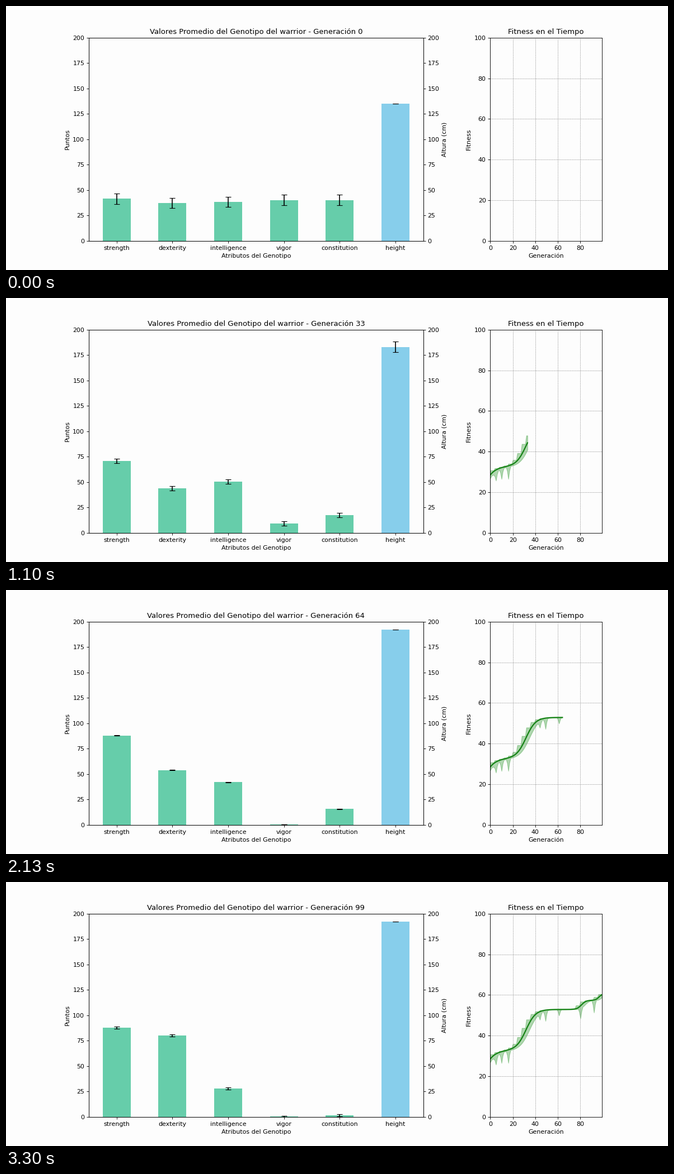
A matplotlib script for the animation above (3.33 s loop, 1183 by 473 pixels).

```python
import numpy as np
import matplotlib.pyplot as plt
from matplotlib.animation import FuncAnimation

W, H, DPI = 1183, 473, 79
LOOP_MS, STEP_MS = 3330, 30
FRAMES = LOOP_MS // STEP_MS
GENERATIONS = 100
PAPER = "#fdfdfd"

gens = np.arange(GENERATIONS)


def sigmoid(g, center, scale):
    return 1 / (1 + np.exp((center - g) / scale))


def bump(center, width):
    return np.exp(-((gens - center) / width) ** 2 / 2)


def trend(*points):
    return np.interp(gens, *zip(*points))


def mean_fitness(g):
    """Quick early gain, then three evolutionary leaps."""
    return (28.5 + 4.3 * (1 - np.exp(-g / 6)) + 20.1 * sigmoid(g, 31.7, 4.3)
            + 4.5 * sigmoid(g, 81, 2) + 3.2 * sigmoid(g, 96.5, 1.5))


# Attribute means: trends through a few (generation, value) turning points
means = {
    "strength": trend((0, 41.5), (16, 61.5), (64, 88), (79, 80.8), (99, 87.8)),
    "dexterity": trend((0, 37.3), (16, 38.5), (64, 54), (99, 80.2)),
    "intelligence": trend((0, 38.6), (16, 51.3), (44, 50.2), (99, 28)),
    "vigor": trend((0, 40.3), (16, 23.3), (44, 0.5), (99, 0.5)),
    "constitution": trend((0, 40.3), (16, 23), (33, 17.5), (79, 15), (99, 1.5)),
    "height": 135 + 57.2 * sigmoid(gens, 30, 1.8),
}
names = list(means)
values = np.array(list(means.values()))

# Deviations: wide at first, then wider again around each leap
spread = 5 * np.exp(-gens / 8) + 3 * bump(40, 9) + 2 * bump(88, 10)
devs = np.tile(spread, (len(names), 1))
devs[-1] = 5.4 * bump(34, 8) + 2.4 * bump(79, 5)
devs = np.minimum(devs, values)

# The best run ahead in steps of four generations, the worst lag by three
average = mean_fitness(gens)
best = mean_fitness(gens // 4 * 4 + 4.5)
worst = mean_fitness(np.maximum(gens - 3, 0))
DIPS = {0: 1.7, 5: 4, 10: 5, 16: 6, 44: 3, 49: 5, 61: 3, 80: 5, 92: 6}
for center, depth in DIPS.items():
    worst -= depth * np.maximum(0, 1 - np.abs(gens - center) / 1.5)

plt.rcParams["font.family"] = "DejaVu Sans"
fig, (ax, fit_ax) = plt.subplots(
    1, 2, figsize=(W / DPI, H / DPI), dpi=DPI, facecolor=PAPER,
    gridspec_kw={"width_ratios": [3, 1], "wspace": 0.3})
height_ax = ax.twinx()

ax.set(ylim=(0, 200), ylabel="Puntos", xlabel="Atributos del Genotipo",
       facecolor=PAPER)
ax.set_xticks(range(len(names)), names)
title = ax.set_title("")

fit_ax.set(xlim=(0, GENERATIONS - 1), ylim=(0, 100), xlabel="Generación",
           ylabel="Fitness", title="Fitness en el Tiempo", facecolor=PAPER)
fit_ax.set_xticks(range(0, GENERATIONS, 20))
fit_ax.grid(color="gray", linestyle="--", linewidth=0.5)

xs = np.arange(len(names))
bars = [*ax.bar(xs[:-1], 0, 0.5, color="mediumaquamarine"),
        *height_ax.bar(xs[-1:], 0, 0.5, color="skyblue")]
stems = height_ax.vlines(xs, 0, 0, color="black", linewidth=1.5)
caps, = height_ax.plot([], [], "_", color="black", markersize=10, markeredgewidth=1)
height_ax.set(xlim=(-0.5, 5.5), ylim=(0, 200), ylabel="Altura (cm)")

band = fit_ax.fill_between([0, 0], [0, 0], color="green", alpha=0.3)
line, = fit_ax.plot([], [], color="#148214", linewidth=2)


def update(frame):
    gen = int(frame * GENERATIONS / FRAMES + 0.8)
    title.set_text(f"Valores Promedio del Genotipo del warrior - Generación {gen}")
    mean, dev = values[:, gen], devs[:, gen]
    for bar, value in zip(bars, mean):
        bar.set_height(value)
    low, high = mean - dev, mean + dev
    stems.set_segments([[(x, a), (x, b)] for x, a, b in zip(xs, low, high)])
    caps.set_data(np.tile(xs, 2), np.concatenate([low, high]))

    past = slice(0, gen + 1)
    line.set_data(gens[past], average[past])
    upper = np.column_stack([gens[past], best[past]])
    lower = np.column_stack([gens[past], worst[past]])
    band.set_verts([np.vstack([upper, lower[::-1]])] if gen else [])
    return [title, *bars, stems, caps, band, line]


anim = FuncAnimation(fig, update, frames=FRAMES, interval=STEP_MS,
                     repeat=True, repeat_delay=0, blit=False)
plt.show()
```
